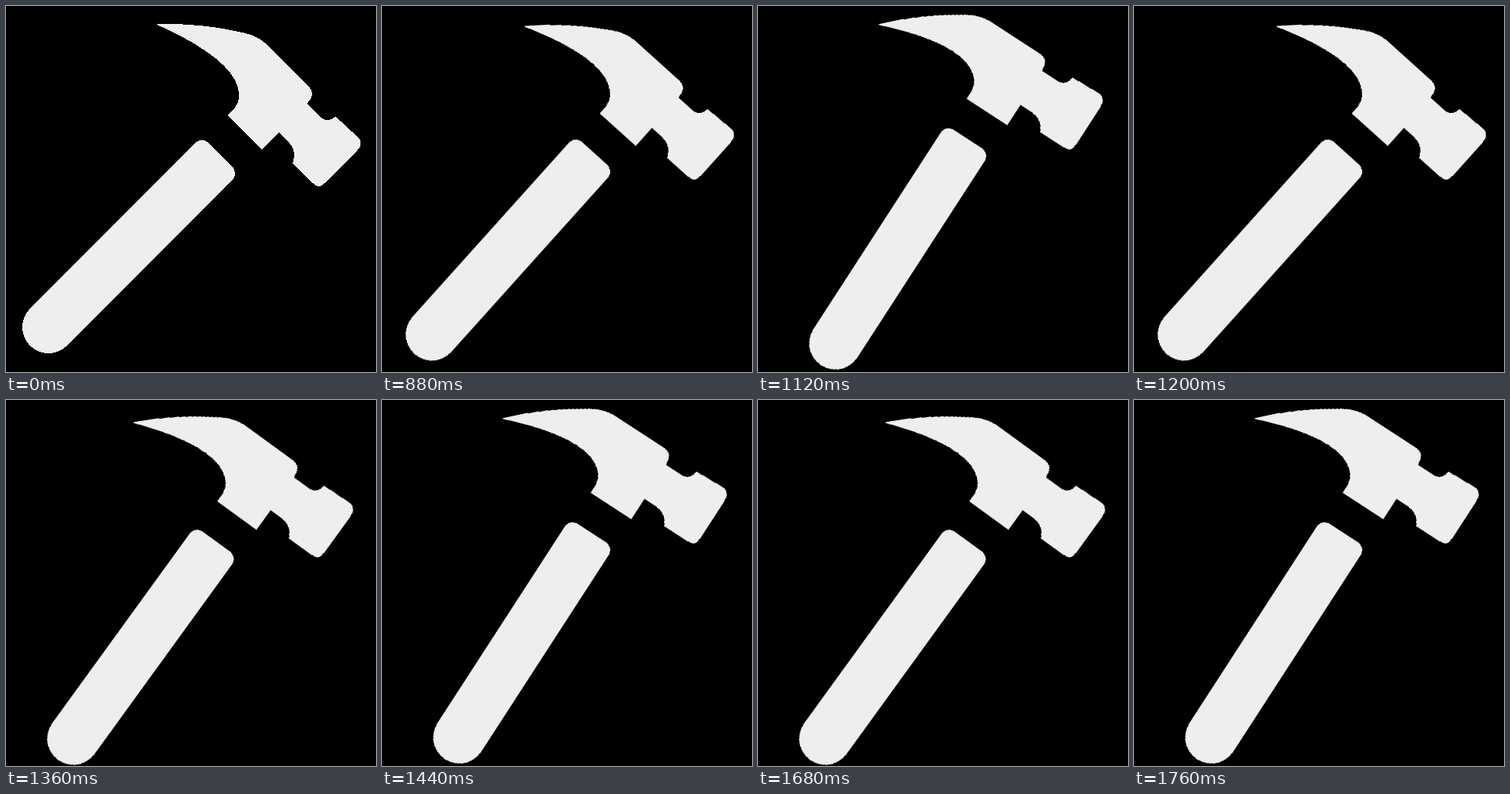
These frames come from a looping animation (475x469 px, 1.84 s). An HTML page:

```html
<!DOCTYPE html>
<html lang="en">
<head>
<meta charset="utf-8">
<title>Hammer</title>
<style>
  html, body { margin: 0; width: 100%; height: 100%; overflow: hidden; background: #000; }
  svg { display: block; width: 475px; height: 469px; }
  .hammer {
    fill: #eee;
    shape-rendering: crispEdges;
    transform-origin: 237.5px 234.5px;
    animation: knock 1840ms step-end infinite;
  }
  /* Rest for 880 ms, then three knocks of four 80 ms poses. */
  @keyframes knock {
    0%, 100% { transform: translate(0, 0) rotate(0deg); }
    47.826%, 65.217%, 82.608% { transform: translate(0, 0) rotate(-3deg); }
    52.173%, 69.565%, 86.956% { transform: translate(0, 0) rotate(-6deg); }
    56.521%, 73.913%, 91.304% { transform: translate(2px, -4px) rotate(-9deg); }
    60.869%, 78.26%, 95.652% { transform: translate(4px, -13.4px) rotate(-12deg); }
  }
</style>
</head>
<body>
<svg viewBox="0 0 475 469">
  <g class="hammer">
    <!-- handle -->
    <path d="M30.8 387.8 L243 175.6 A12 12 0 0 1 260 175.6 L290.4 206
             A12 12 0 0 1 290.4 223 L78.2 435.2 A33.5 33.5 0 0 1 30.8 387.8Z"/>
    <!-- head -->
    <path d="M194 23 C228 22.5 262 25 294 32 C310 35 322 38 332 47
             L388 102.5 C395 109 395 116 386.5 125
             L402 140.5 C408 148 416 148 423 141.5
             L451 167.5 Q460 176 451 185
             L409 227 Q402 235 394 227
             L368 202 C371 192 371 182 364 176
             L350 162 L328.5 184 L284 140 L294 130
             C301.5 122 300.5 108 294.5 96 C281 69 238 43.5 194 24Z"/>
  </g>
</svg>
</body>
</html>
```
